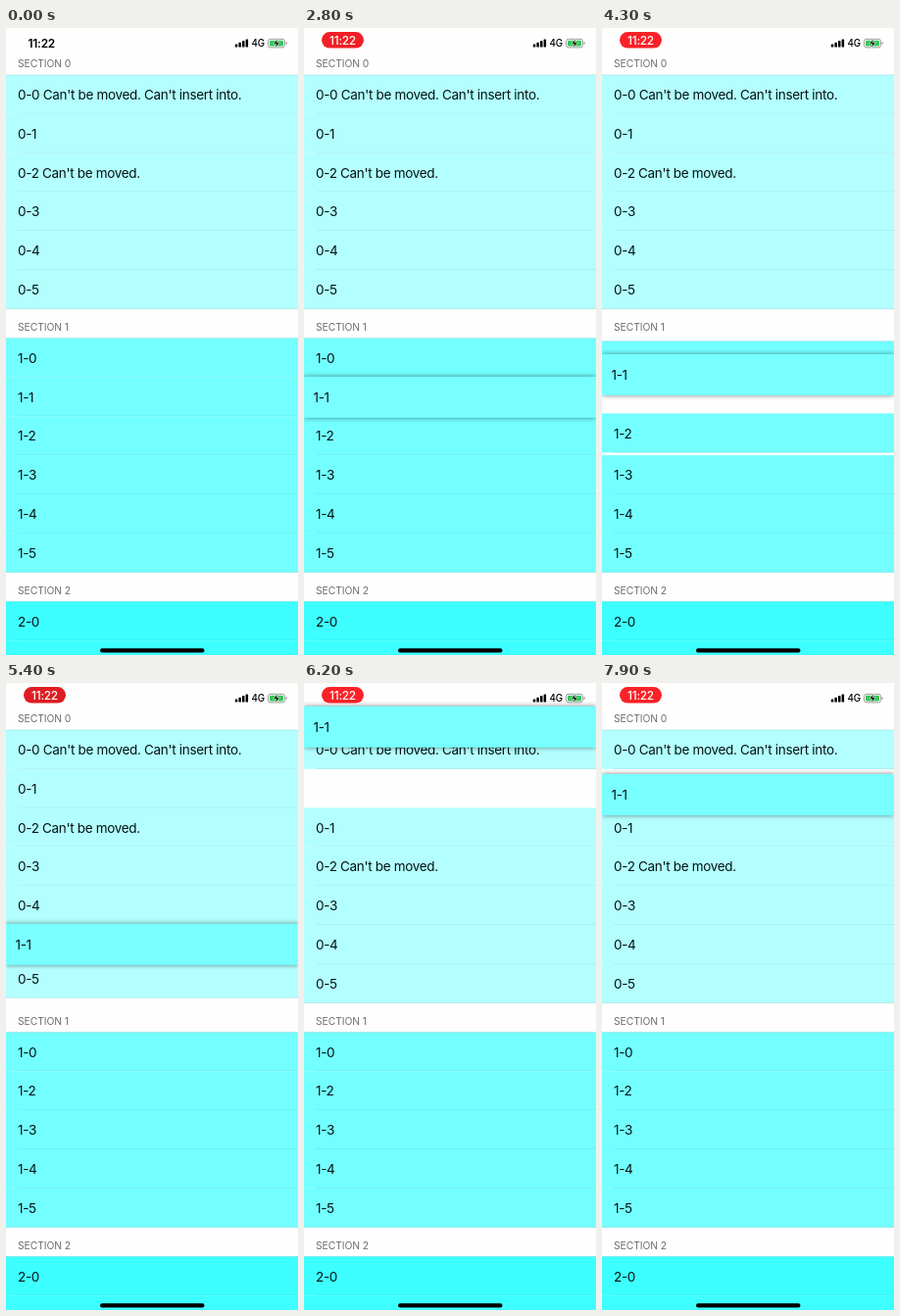
Recreate the animation shown at these times as an HTML page. Size 298x640 px, loop 8000 ms.

```html
<!DOCTYPE html>
<html lang="en">
<head>
<meta charset="utf-8">
<title>Reorderable list</title>
<style>
  html, body { margin: 0; width: 100%; height: 100%; overflow: hidden; background: #fff; }
  svg { display: block; width: 100vw; height: 100vh; font-family: Inter, "Liberation Sans", sans-serif; }
  .cell { font-size: 13.5px; letter-spacing: -.32px; fill: #051214; }
  .head { font-size: 10.3px; letter-spacing: -.05px; fill: #6d6d72; }
  .line { stroke: #00505a; stroke-opacity: .14; stroke-width: .8; }
  #lifted { filter: drop-shadow(0 0 2.5px rgba(0, 0, 0, .5)); }
</style>
</head>
<body>
<svg id="stage" viewBox="0 0 298 640" preserveAspectRatio="none">
  <rect width="298" height="640" fill="#fefefe"/>
  <g id="list"></g>
  <g id="lifted">
    <rect id="card" width="298" fill="#78ffff"/>
    <text id="cardText" class="cell">1-1</text>
  </g>
  <g id="status">
    <text id="clock" x="22.5" y="20" font-size="11.8" font-weight="600" letter-spacing="-.2">11:22</text>
    <g id="pill">
      <rect id="pillShape" x="18" y="4" width="43" height="16.6" rx="8.3"/>
      <g id="recordIcon" fill="#fff">
        <circle cx="39.5" cy="12.3" r="5.5" fill="none" stroke="#fff" stroke-width="1.2"/>
        <circle cx="39.5" cy="12.3" r="3.2"/>
      </g>
      <text id="pillTime" x="39.5" y="16.5" text-anchor="middle" font-size="11.8" font-weight="500" letter-spacing="-.2" fill="#fff">11:22</text>
    </g>
    <g id="signal"></g>
    <text x="250.5" y="19.3" font-size="9.8" font-weight="500" letter-spacing="-.1">4G</text>
    <rect x="267.5" y="11.3" width="17" height="8.6" rx="2.4" fill="none" stroke="#999"/>
    <rect x="269" y="12.8" width="14" height="5.6" rx="1.2" fill="#35c759"/>
    <path d="M285.6 14v3.2q1.3-.4 1.3-1.6t-1.3-1.6" fill="#999"/>
    <path d="M277.4 10.8l-4.6 5.4h2.9l-1.2 4.3 4.9-5.7h-3z" fill="#000" stroke="#fff" stroke-width=".6"/>
  </g>
  <rect x="96" y="633.3" width="106.5" height="4.2" rx="2.1"/>
</svg>
<script>
const LOOP = 8000;
const ROW = 39.83;
const SHIFT_TIME = 300;
const LIFT_AT = 2400;
const PILL_AT = 1200;
const TIME_AT = 2500;
const NS = 'http://www.w3.org/2000/svg';
const $ = id => document.getElementById(id);

function add(parent, tag, attrs, text = '') {
  const node = document.createElementNS(NS, tag);
  for (const key in attrs) node.setAttribute(key, attrs[key]);
  node.textContent = text;
  parent.append(node);
  return node;
}

const smooth = x => {
  const u = Math.min(1, Math.max(0, x));
  return u * u * (3 - 2 * u);
};
const ramp = (t, start, span = SHIFT_TIME) => smooth((t - start) / span);

// Centre of the dragged row: [time, y]
const path = [
  [2500, 376.5], [2900, 379], [3300, 402], [3500, 409], [3750, 411], [4050, 393],
  [4300, 354], [4700, 318], [5150, 292], [5400, 267], [6200, 45], [6500, 40],
  [7200, 85], [7900, 114], [8000, 115]
];

function dragY(t) {
  if (t <= path[0][0]) return path[0][1];
  const i = path.findIndex(p => p[0] >= t) - 1;
  const slope = k => {
    const a = path[k - 1], b = path[k], c = path[k + 1];
    if (!a || !c || (b[1] - a[1]) * (c[1] - b[1]) <= 0) return 0;
    return (c[1] - a[1]) / (c[0] - a[0]);
  };
  const [t0, y0] = path[i], [t1, y1] = path[i + 1];
  const span = t1 - t0, u = (t - t0) / span, v = 1 - u;
  return y0 * v * v * (1 + 2 * u) + y1 * u * u * (3 - 2 * u)
    + span * u * v * (slope(i) * v - slope(i + 1) * u);
}

// How far an item is pushed away from its resting place, in rows
function rowShift(section, index) {
  if (section === 0 && index === 5) return t => ramp(t, 5170);
  if (section === 0 && index > 0) return t => ramp(t, 5480 + 135 * (4 - index));
  if (section === 1 && index === 0) return t => ramp(t, 4250);
  if (section === 1 && index === 2) return t => ramp(t, 4050) - ramp(t, 3230);
  return () => 0;
}

const moving = [];
const sections = [
  { top: 47.8, count: 6, color: '#b3ffff' },
  { top: 316.6, count: 6, color: '#73ffff' },
  { top: 585.4, count: 2, color: '#3dffff' }
];
const notes = { '0-0': " Can't be moved. Can't insert into.", '0-2': " Can't be moved." };

function addItem(y, shift) {
  const item = { node: add($('list'), 'g', {}), y, shift };
  moving.push(item);
  return item.node;
}

sections.forEach(({ top, count, color }, s) => {
  const header = addItem(top, s === 1 ? t => ramp(t, 4680) : () => 0);
  add(header, 'text', { class: 'head', x: 12, y: s ? -7.6 : -7.4 }, 'SECTION ' + s);
  for (let i = 0; i < count; i++) {
    const name = s + '-' + i;
    const node = addItem(top + i * ROW, rowShift(s, i));
    if (name === '1-1') node.id = 'resting';
    add(node, 'rect', { width: 298, height: ROW + .1, fill: color });
    add(node, 'text', { class: 'cell', x: 12, y: 25.2 }, name + (notes[name] || ''));
    if (i === 0) add(node, 'path', { class: 'line', d: 'M0 0H298' });
    add(node, 'path', { class: 'line', d: `M${i === 5 ? 0 : 12} ${ROW - .2}H298` });
  }
});

for (let i = 0; i < 4; i++) {
  const h = 3 + i * 1.7;
  add($('signal'), 'rect', { x: 233.8 + i * 3.6, y: 19.5 - h, width: 2.5, height: h, rx: .6 });
}

function drawCard(t) {
  const lift = ramp(t, LIFT_AT, 200);
  const height = ROW + 2.2 * lift;
  const y = dragY(t);
  const visible = t >= LIFT_AT;
  $('lifted').style.display = visible ? '' : 'none';
  $('resting').style.display = visible ? 'none' : '';
  $('card').setAttribute('y', y - height / 2);
  $('card').setAttribute('height', height);
  $('cardText').setAttribute('x', 12 - 2.5 * lift);
  $('cardText').setAttribute('y', y + 5.2);
}

function drawPill(t) {
  const shown = ramp(t, PILL_AT, 250);
  const swap = ramp(t, TIME_AT, 250);
  const glow = (1 + Math.cos((t - 4300) / 1850 * 2 * Math.PI)) / 2;
  $('clock').setAttribute('opacity', 1 - shown);
  $('pill').setAttribute('opacity', shown);
  $('pillShape').setAttribute('fill', `rgb(${218 + 32 * glow}, ${28 + 6 * glow}, ${34 + 6 * glow})`);
  $('recordIcon').setAttribute('opacity', 1 - swap);
  $('pillTime').setAttribute('opacity', swap);
}

function draw(t) {
  for (const { node, y, shift } of moving) {
    node.setAttribute('transform', `translate(0 ${y + ROW * shift(t)})`);
  }
  drawCard(t);
  drawPill(t);
}

const start = performance.now();
function tick() {
  draw((performance.now() - start) % LOOP);
  requestAnimationFrame(tick);
}
tick();
</script>
</body>
</html>
```
